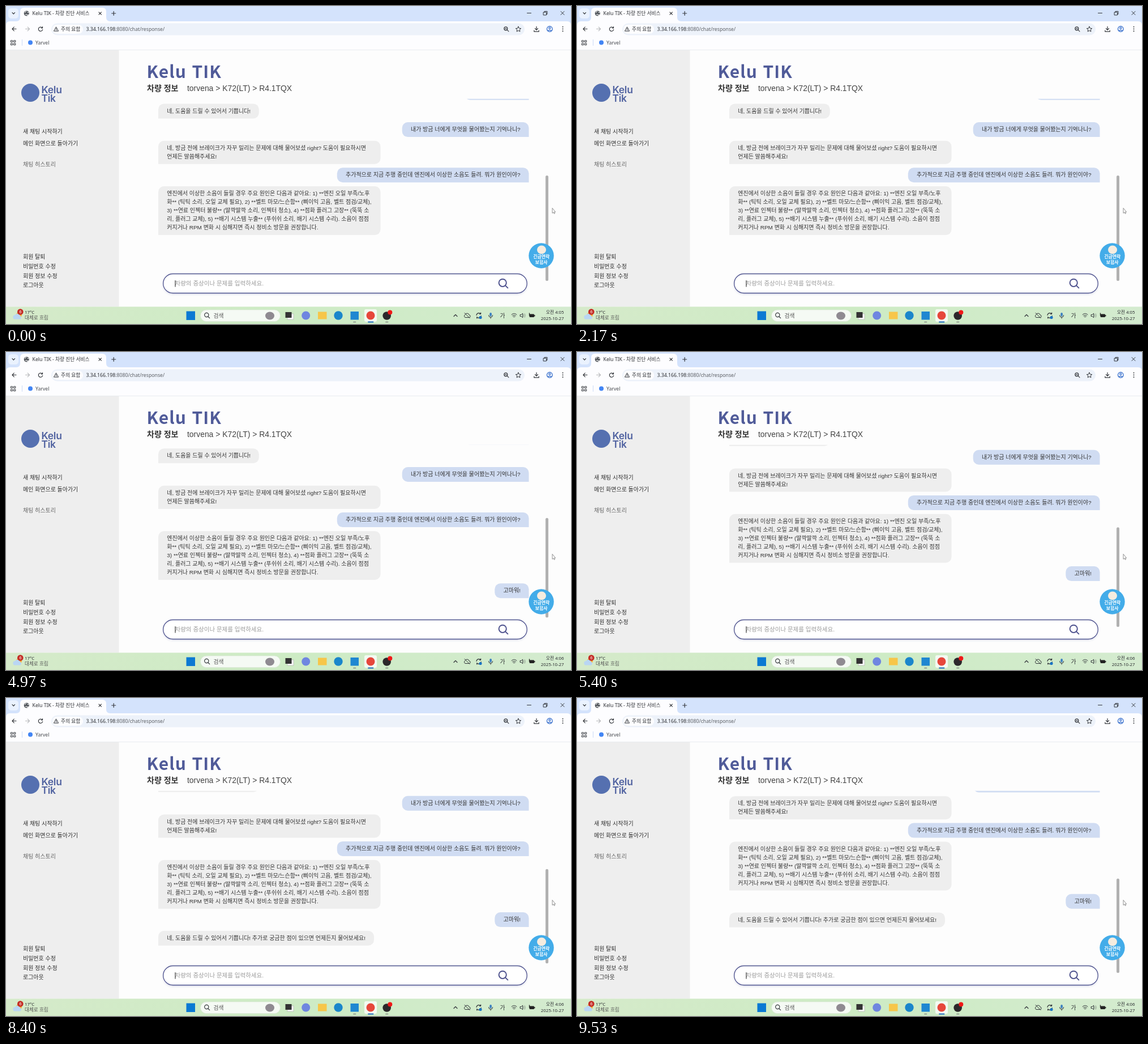
These frames come from a looping animation (998 by 561 pixels, 9560 ms). An HTML page:

```html
<!DOCTYPE html>
<html lang="ko">
<head>
<meta charset="utf-8">
<title>Chat</title>
<style>
html, body { margin: 0; width: 100%; height: 100%; overflow: hidden; background: #fdfdfd; }
svg { display: block; width: 100vw; height: 100vh; }
text { white-space: pre; }
.ui { font-family: "Noto Sans", "Noto Sans CJK KR", "Noto Sans CJK", sans-serif; font-size: 8.7px; fill: #2b2d31; }
.page { font-family: "Liberation Sans", "Noto Sans CJK KR", "Noto Sans CJK", sans-serif; font-size: 9.98px; fill: #333; }
.brand { font-weight: 900; font-size: 30px; letter-spacing: 1.1px; fill: #505b99; font-family: "Noto Sans CJK KR", "Noto Sans CJK", "Noto Sans", sans-serif; }
.mark { font: 600 17.5px Inter, sans-serif; letter-spacing: -.3px; fill: #5062a0; }
.line { fill: none; stroke: #33363b; stroke-width: 1.2; stroke-linecap: round; stroke-linejoin: round; }
.thin { stroke-width: 1; }
</style>
</head>
<body>
<svg viewBox="0 0 998 561" preserveAspectRatio="none">
  <defs>
    <clipPath id="view"><rect x="200" y="163.800" width="798" height="321.200"/></clipPath>
    <linearGradient id="bar">
      <stop offset="0" stop-color="#d5eaca"/><stop offset=".5" stop-color="#cdebc4"/><stop offset="1" stop-color="#d4ebcf"/>
    </linearGradient>
    <filter id="soft" x="-5%" y="-30%" width="110%" height="170%">
      <feDropShadow dx="0" dy="1.5" stdDeviation="1.800" flood-color="#4a4f95" flood-opacity=".2"/>
    </filter>
  </defs>
  <rect width="998" height="561" fill="#fdfdfd"/>

  <!-- browser frame -->
  <g class="ui">
    <rect width="998" height="36" fill="#d4e3fc"/>
    <path d="M0 34Q0 27 7 27H18Q25 27 25 20V10Q25 3 32 3H170Q177 3 177 10V20Q177 27 184 27H991Q998 27 998 34V78H0Z" fill="#fdfdff"/>
    <rect x="4" y="4" width="18" height="18" rx="5.5" fill="#eaf2fe"/>
    <path class="line" d="M11 11.7l2.3 2.3 2.3-2.3"/>
    <circle cx="36.3" cy="13" r="4.6" fill="#53575d"/>
    <path d="M33 11.5q2 0 2.4-2.3M34 15.5q2-1.6 3.4.2t2.4-1M37.8 10.5q1 1.6 2.4 1" fill="none" stroke="#fff" stroke-width="1.1"/>
    <text x="46.5" y="16.4">Kelu TIK - 차량 진단 서비스</text>
    <path class="line" d="M164 10.8l4.4 4.4m0-4.4l-4.4 4.4M186.7 13h7m-3.500-3.500v7"/>
    <path class="line thin" d="M920.500 12.500h7M949.500 11h5v5h-5zM951 11v-1.600h5v5h-1.500M980 9.500l6 6m0-6l-6 6"/>
    <path class="line" d="M18 40.500h-7m3.300-3.300l-3.300 3.300 3.300 3.300"/>
    <path class="line" stroke-opacity=".35" d="M34.500 40.500h7m-3.300-3.300l3.300 3.300-3.300 3.300"/>
    <path class="line" d="M64 38.500a3.700 3.700 0 1 0 .7 3M64.500 36.500v2.500h-2.500"/>
    <rect x="80" y="30.500" width="836" height="21" rx="10.500" fill="#edf2fa"/>
    <rect x="82" y="33" width="54" height="16" rx="8" fill="#fdfdff"/>
    <path class="line thin" d="M88.700 37.200l3.900 7h-7.800zM88.700 39.700v2m0 1.200v.1"/>
    <text x="97" y="43.800">주의 요함</text>
    <text x="141.500" y="43.800">3.34.166.198<tspan fill="#5a5e64">:8080/chat/response/</tspan></text>
    <circle class="line" cx="882.800" cy="39.800" r="3"/>
    <path class="line" d="M885.200 42.200l2.700 2.700M881.500 39.800h2.600"/>
    <path class="line thin" d="M905 36.200l1.400 3 3.300.4-2.500 2.200.7 3.300-2.900-1.700-2.900 1.700.7-3.300-2.500-2.200 3.300-.4z"/>
    <path class="line" d="M937 36.300v6m-2.600-2.600l2.600 2.600 2.600-2.600M932.800 43v2.200h8.400V43"/>
    <g class="line" style="stroke:#2864c8"><circle cx="960.300" cy="40.500" r="4.800"/><circle cx="960.300" cy="39" r="1.500"/><path d="M957.400 43.800q2.900-2.200 5.800 0"/></g>
    <path d="M983.500 36.700v.1m0 3.700v.1m0 3.700v.1" stroke="#33363b" stroke-width="1.900" stroke-linecap="round"/>
    <path class="line thin" d="M8.800 60.800h2.800v2.800h-2.800zM14 60.800h2.800v2.800H14zM8.800 66h2.800v2.800h-2.800zM14 66h2.800v2.800H14z"/>
    <path d="M28.500 59v11" stroke="#cddcf5"/>
    <circle cx="43" cy="64.500" r="4" fill="#4285f4"/>
    <text x="52" y="67.600" fill="#4a4d52">Yarvel</text>
    <path d="M0 77.500h998" stroke="#e9ecef"/>
  </g>

  <!-- page -->
  <g class="page">
    <rect y="78" width="199.500" height="452.500" fill="#eee"/>
    <circle cx="43" cy="153" r="16" fill="#5570b0"/>
    <text class="mark" x="62.500" y="153.800">Kelu</text>
    <text class="mark" x="62.500" y="168.600">Tik</text>
    <g id="menu"></g>
    <text class="brand" x="248.500" y="126.700">Kelu TIK</text>
    <text x="249" y="150.300" font-size="14" font-weight="700">차량 정보</text>
    <text x="320" y="150.300" font-size="13.900" fill="#444">torvena &gt; K72(LT) &gt; R4.1TQX</text>
    <g clip-path="url(#view)">
      <g id="chat"></g>
      <rect id="thumb" x="953" width="5" rx="2.500" fill="#b1b1b1"/>
    </g>
    <rect x="277.700" y="472.500" width="642.500" height="34" rx="17" fill="#fff" stroke="#50548f" stroke-width="1.300" filter="url(#soft)"/>
    <text id="hint" x="298.500" y="493" font-size="10.500" fill="#9b9b9b">차량의 증상이나 문제를 입력하세요.</text>
    <text id="typed" x="298.500" y="493" font-size="10.500"></text>
    <rect id="caret" y="484" width="1" height="11.500" fill="#111"/>
    <g fill="none" stroke="#50548f" stroke-width="2" stroke-linecap="round"><circle cx="877.200" cy="488.300" r="6.600"/><path d="M882 493.100l4.300 4.300"/></g>
    <circle cx="945.500" cy="440.500" r="22.200" fill="#43ace9"/>
    <ellipse cx="946" cy="430" rx="8" ry="7.500" fill="#f6ecdf"/>
    <g fill="#fff" font-size="7.900" font-weight="700" text-anchor="middle">
      <text x="945.700" y="445.200">긴급연락</text><text x="945.700" y="454.700">보험사</text>
    </g>
    <path d="M965 356.500v9l2-1.700 1.300 2.700 1.300-.6-1.200-2.600h2.200z" fill="#fff" stroke="#777" stroke-width=".8"/>
  </g>

  <!-- taskbar -->
  <g class="ui">
    <rect y="530.500" width="998" height="31" fill="url(#bar)"/>
    <circle cx="23" cy="545" r="5" fill="#f5b13c"/>
    <path d="M16 552.500a3.600 3.600 0 0 1 0-7.200 4.600 4.600 0 0 1 8.600 1 3.200 3.200 0 0 1 0 6.200z" fill="#b9d6f3"/>
    <circle cx="25.300" cy="539.500" r="5.300" fill="#c42b25"/>
    <text x="25.300" y="542.300" font-size="7.500" text-anchor="middle" style="fill:#fff">6</text>
    <text x="33" y="543" style="font-size:7.800px">17°C</text>
    <text x="33" y="553.400" style="font-size:8.600px;fill:#555">대체로 흐림</text>
    <rect x="318.500" y="538.500" width="15.500" height="15.500" fill="#0b79d3"/>
    <rect x="343.500" y="536" width="141" height="20.500" rx="10.250" fill="#f5faf4" stroke="#d8e5d5" stroke-width=".7"/>
    <g class="line"><circle cx="354.300" cy="545" r="3.600"/><path d="M357 548l2.700 2.700"/></g>
    <text x="366.500" y="549.700" style="font-size:9.800px;fill:#555">검색</text>
    <ellipse cx="466" cy="546.500" rx="8" ry="7" fill="#8f8a91"/>
    <rect x="497" y="543" width="11" height="10" fill="#f8f8f8" stroke="#aaa" stroke-width=".6"/>
    <rect x="493.500" y="540" width="11" height="10" fill="#333"/>
    <circle cx="529.700" cy="546" r="7.500" fill="#6f86e0"/>
    <rect x="551" y="539.500" width="15.500" height="13" fill="#f7c64a"/>
    <circle cx="587" cy="546" r="7.700" fill="#1a86cb"/>
    <rect x="608.500" y="539" width="14.500" height="14.500" fill="#1f87d1"/>
    <rect x="633" y="535" width="22" height="22" rx="3" fill="#f3faf1"/>
    <circle cx="644" cy="546" r="7.500" fill="#e6473b"/>
    <path d="M640 557.500h8.500" stroke="#1769bd" stroke-width="1.800" stroke-linecap="round"/>
    <circle cx="672.700" cy="546.500" r="7.300" fill="#2b282b"/>
    <circle cx="678.300" cy="540.500" r="4" fill="#f01818"/>
    <path d="M614 557.500h3.500M671 557.500h3.500" stroke="#858b84" stroke-width="1.700" stroke-linecap="round"/>
    <path class="line" d="M791 547.500l3-3 3 3"/>
    <path class="line thin" d="M811.500 549.500h6.500a2.200 2.200 0 0 0 0-4.400 3.600 3.600 0 0 0-7-.4 2.500 2.500 0 0 0 .5 4.800M810 541.500l9 9"/>
    <path class="line" d="M831 545.500a4.300 4.300 0 0 1 7.600-2.200v-2.200m0 2.200h-2.300M839.300 546.500a4.300 4.300 0 0 1-7.600 2.200v2.200"/>
    <circle cx="838" cy="549.500" r="2.600" fill="#1974c5"/>
    <rect x="854.300" y="541" width="3.600" height="6.500" rx="1.800" fill="#3a7fc0"/>
    <path class="line thin" d="M852.500 545.500a3.600 3.600 0 0 0 7.200 0M856.100 549.200v2"/>
    <text x="872.500" y="549.500" style="font-size:9.800px">가</text>
    <path class="line thin" d="M893 544.500q4.500-4.200 9 0M894.700 546.500q2.800-2.600 5.600 0M896.200 548.400q1.300-1.200 2.600 0"/>
    <path class="line thin" d="M908.500 544.500h1.700l2.500-2.300v7.600l-2.500-2.300h-1.700z"/>
    <path class="line thin" stroke-opacity=".4" d="M914.500 544q1.500 2 0 4M916.300 542.700q2.200 3.300 0 6.600"/>
    <rect x="924.500" y="543.500" width="8.500" height="5.500" rx="1.300" fill="#222"/>
    <path d="M933.800 545v2.500M924.500 541.500v5" stroke="#222" stroke-width="1.300"/>
    <g text-anchor="end" style="font-size:7.800px"><text id="clock" x="985.500" y="543"></text><text x="985.500" y="553.500">2025-10-27</text></g>
  </g>
</svg>
<script>
const LOOP = 9560, SEND = 4920, REPLY = 8390, STEP = 32.3, VIEW = 321, TOP = 164;
const KEYS = ['ㄱ', '고', '곰', '고마', '고망', '고마우', '고마워', '고마워!'];
const KEY_START = 3400, KEY_GAP = 150, BLINK = 530;
const $ = id => document.getElementById(id);

function add(parent, tag, attrs, text = '') {
  const node = document.createElementNS('http://www.w3.org/2000/svg', tag);
  for (const k in attrs) node.setAttribute(k, attrs[k]);
  node.textContent = text;
  return parent.appendChild(node);
}

// Speech bubble with a single square bottom corner
function bubble(mine, x, y, w, lines) {
  const g = add($('chat'), 'g', {}), h = 11 + 15 * lines.length, r = 10;
  const corner = (dx, dy) => `a${r} ${r} 0 0 1 ${dx} ${dy}`;
  const right = mine ? `V${y + h}` : `V${y + h - r}${corner(-r, r)}`;
  const left = mine ? `H${x + r}${corner(-r, -r)}` : `H${x}`;
  add(g, 'path', {
    d: `M${x + r} ${y}H${x + w - r}${corner(r, r)}${right}${left}V${y + r}${corner(r, -r)}Z`,
    fill: mine ? '#d0dcf2' : '#eee'
  });
  lines.forEach((s, i) => add(g, 'text', { x: x + 15.3, y: y + 16.2 + i * 15 }, s));
  return g;
}

[[221, '새 채팅 시작하기'], [242.3, '메인 화면으로 돌아가기'], [279, '채팅 히스토리', '#666'],
 [442.5, '회원 탈퇴'], [459.3, '비밀번호 수정'], [476, '회원 정보 수정'], [492.7, '로그아웃']]
  .forEach(([y, s, fill = '#2e2e2e']) => add($('menu'), 'text', { x: 30, y: y + 3.6, fill, 'font-weight': y > 270 ? 500 : 400 }, s));

bubble(true, 810, 139.8, 113.5, ['']);
bubble(false, 269, 172.4, 177.8, ['네, 도움을 드릴 수 있어서 기쁩니다!']);
bubble(true, 699.7, 205.1, 223.8, ['내가 방금 너에게 무엇을 물어봤는지 기억나니?']);
bubble(false, 269, 237.8, 392.5, ['네, 방금 전에 브레이크가 자꾸 밀리는 문제에 대해 물어보셨 right? 도움이 필요하시면', '언제든 말씀해주세요!']);
bubble(true, 584.8, 285.2, 338.7, ['추가적으로 지금 주행 중인데 엔진에서 이상한 소음도 들려. 뭐가 원인이야?']);
bubble(false, 269, 318.1, 392.5, [
  '엔진에서 이상한 소음이 들릴 경우 주요 원인은 다음과 같아요: 1) **엔진 오일 부족/노후',
  '화** (틱틱 소리, 오일 교체 필요), 2) **벨트 마모/느슨함** (삐이익 고음, 벨트 점검/교체),',
  '3) **연료 인젝터 불량** (딸깍딸깍 소리, 인젝터 청소), 4) **점화 플러그 고장** (뚝뚝 소',
  '리, 플러그 교체), 5) **배기 시스템 누출** (푸쉬쉬 소리, 배기 시스템 수리). 소음이 점점',
  '커지거나 RPM 변화 시 심해지면 즉시 정비소 방문을 권장합니다.'
]);
const thanks = bubble(true, 863.3, 410.4, 60.2, ['고마워!']);
const answer = bubble(false, 269, 443, 381, ['네, 도움을 드릴 수 있어서 기쁩니다! 추가로 궁금한 점이 있으면 언제든지 물어보세요!']);

const show = (node, on) => node.setAttribute('visibility', on ? 'visible' : 'hidden');
function ease(t, start, length = 135) {
  const p = Math.min(1, Math.max(0, (t - start) / length));
  return p * p * (3 - 2 * p);
}

function draw(t) {
  const sent = t >= SEND, replied = t >= REPLY;
  const scroll = STEP * (ease(t, SEND + 30) + ease(t, REPLY + 20));
  show(thanks, sent);
  show(answer, replied);
  $('chat').setAttribute('transform', `translate(0 ${-scroll})`);

  const total = 554 + STEP * (sent + replied), ratio = VIEW / total;
  $('thumb').setAttribute('y', TOP + (554 - VIEW + scroll) * ratio);
  $('thumb').setAttribute('height', VIEW * ratio);

  const key = Math.min(KEYS.length - 1, Math.floor((t - KEY_START) / KEY_GAP));
  const typing = key >= 0 && !sent;
  $('typed').textContent = typing ? KEYS[key] : '';
  show($('hint'), !typing);
  const last = sent ? SEND : typing ? KEY_START + key * KEY_GAP : -240;
  $('caret').setAttribute('x', 298.5 + (typing ? $('typed').getComputedTextLength() : 0));
  show($('caret'), (t - last) % (2 * BLINK) < BLINK);
  $('clock').textContent = t < 3300 ? '오전 4:05' : '오전 4:06';
}

const start = performance.now();
function tick() {
  draw((performance.now() - start) % LOOP);
  requestAnimationFrame(tick);
}
tick();
</script>
</body>
</html>
```
